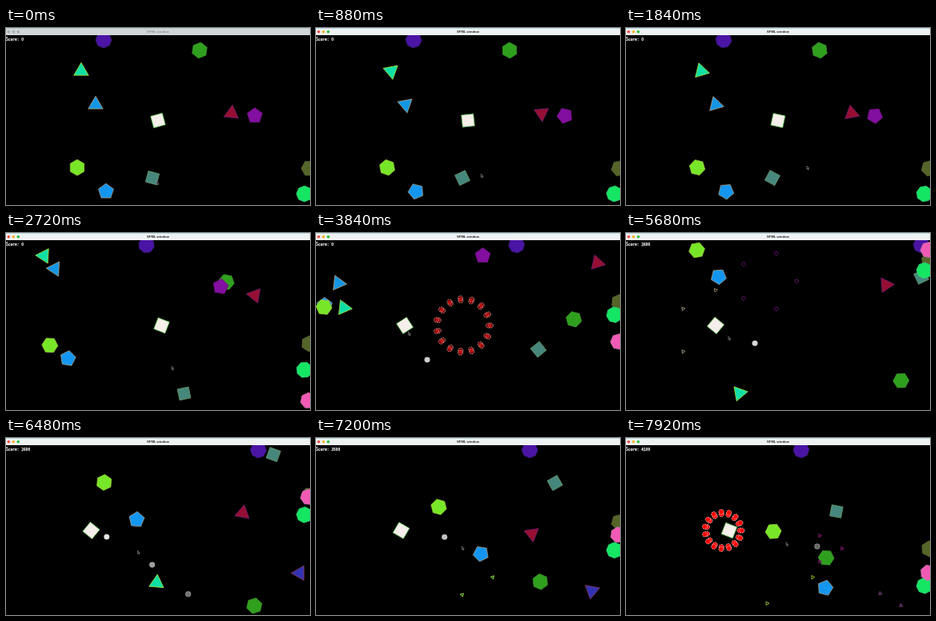
An HTML page that plays this animation: 380x222 px, repeating every 8 s.

```html
<!DOCTYPE html>
<html lang="en">
<head>
<meta charset="utf-8">
<title>SFML window</title>
<style>
html, body { margin: 0; width: 100%; height: 100%; overflow: hidden; background: #000; }
svg { display: block; width: 380px; height: 222px; }
.title { font: bold 4.2px "Liberation Sans", Arial, sans-serif; text-anchor: middle; }
.score {
  font: 5.5px "Noto Sans Mono CJK JP", "Noto Sans Mono", monospace;
  fill: #fff; stroke: #fff; stroke-width: .25; white-space: pre;
}
</style>
</head>
<body>
<svg viewBox="0 0 380 222">
  <rect width="380" height="222"/>
  <g id="scene"></g>
  <text class="score" id="score" x="0" y="16"></text>
  <g id="bar"></g>
  <path id="cursor" d="M0 0V4L1 3.2L1.7 5L2.4 4.6L1.7 3H2.9Z" fill="#111" stroke="#aaa" stroke-width=".5"/>
</svg>
<script>
const LOOP = 8000, STEP = 80;
const START = 1920;          // enemies begin to travel
const CRASH = 4130;          // the player is hit and returns to the middle
const HOME = { x: 190, y: 116 };
const WALL = { l: 8.5, r: 371.5, t: 18, b: 214.5 };
const SPIN = .0563, PLAYER_SPIN = .1125;   // degrees per ms
const BULLET_SPEED = .11;                  // px per ms
const el = id => document.getElementById(id);

// x, y: place at START; heading: compass letters; speed: px per second on each axis
const enemy = (sides, x, y, heading, speed, fill, line, more) => ({
  sides, x, y, fill, line,
  vx: speed * (heading.includes('e') - heading.includes('w')),
  vy: speed * (heading.includes('s') - heading.includes('n')),
  turn: 0, born: 0, dies: Infinity, shots: [], ...more
});

// shots: when each shard of a broken enemy is shot
const enemies = [
  enemy(8, 122, 15, 'e', 67, '#4a14a5', '#3c1c78'),
  enemy(6, 242, 28, 'se', 41.8, '#2fa01e', '#3f8c30', { turn: 8 }),
  enemy(3, 94, 54, 'nw', 58.2, '#10dfa5', '#b4e632', { dies: 6600, shots: [, , 7200] }),
  enemy(3, 112, 96, 'nw', 64, '#1496e6', '#b9a27c', { dies: 4762, shots: [4850] }),
  enemy(3, 282, 107, 'ne', 36.2, '#960f32', '#6e1e78', { turn: 6, dies: 7710 }),
  enemy(5, 311, 110, 'nw', 53.4, '#820fa0', '#6e1478', { dies: 4437 }),
  enemy(5, 125, 205, 'nw', 59.5, '#1496f0', '#a89a7c'),
  enemy(6, 89, 175, 'nw', 42.7, '#78e628', '#9bc83c'),
  enemy(4, 183, 188, 'se', 49.5, '#46877d', '#6f9a68', { turn: 60 }),
  enemy(6, 379, 176, 'n', 46.5, '#556428', '#5f6937', { turn: 30 }),
  enemy(8, 373, 208, 's', 61.7, '#14e664', '#3cc878'),
  enemy(7, 378, 263, 'n', 66, '#f05ab4', '#c878aa', { born: 2480 }),
  enemy(3, 45, 20, 'se', 39.8, '#5a82a0', '#b9a27c', { born: 3920, dies: CRASH, shots: [4700, 5360] }),
  enemy(3, 508.4, 28, 'sw', 31, '#3232b4', '#8c3c50', { turn: 25, born: 5760, dies: 7790 })
];

const shot = (t, x, y, end = Infinity) => ({ t, x, y, end });
const bullets = [
  shot(3449, 139, 159),
  shot(4615, 152, 117, 5360),
  shot(5370, 228, 196),
  shot(5710, 181, 158, 6600),
  shot(6290, 126, 124, 7200),
  shot(6702, 239, 136)
];
const blasts = [2860, 7820];

const playerPath = [[0, 190], [2660, 190], [2720, 194.5], [3840, 111], [CRASH, 133],
  [CRASH, HOME.x], [4640, HOME.x], [5754, 106.5], [7620, 106.5], [8000, 135]];
const mousePath = [[0, 188, 192], [1840, 226, 173], [2720, 207, 167], [3840, 115.5, 124],
  [4960, 95, 119.5], [6480, 164.5, 141], [8000, 202, 130]];

function along(keys, t, k = 1) {
  const i = keys.findIndex(key => key[0] > t), a = keys[i - 1], b = keys[i];
  return a[k] + (b[k] - a[k]) * (t - a[0]) / (b[0] - a[0]);
}

// reflects a straight path between two walls
function bounce(p, lo, hi) {
  const span = hi - lo;
  const m = (((p - lo) % (2 * span)) + 2 * span) % (2 * span);
  return lo + (m > span ? 2 * span - m : m);
}

function place(e, t) {
  const s = Math.max(0, t - START) / 1000;
  return [
    e.vx ? bounce(e.x + e.vx * s, WALL.l, WALL.r) : e.x,
    e.vy ? bounce(e.y + e.vy * s, WALL.t, WALL.b) : e.y
  ];
}

const around = (n, cx, cy, r, deg = 0) => Array.from({ length: n }, (_, i) => {
  const a = deg * Math.PI / 180 + i * 2 * Math.PI / n;
  return [cx + r * Math.cos(a), cy + r * Math.sin(a)];
});

const polygon = (n, x, y, r, deg, fill, line, alpha = 1) =>
  `<polygon points="${around(n, x, y, r, deg - 90).join(' ')}" fill="${fill}" ` +
  `fill-opacity="${alpha}" stroke="${line}" stroke-width=".8"/>`;

const disc = (x, y, r, rest) => `<circle cx="${x}" cy="${y}" r="${r}" ${rest}/>`;

function drawShards(e, t) {
  const age = (t - e.dies) / 1000;
  if (age > 1.6) return '';
  return around(e.sides, ...place(e, e.dies), 15 + 17.4 * age)
    .filter((_, i) => !(e.shots[i] <= t))
    .map(([x, y]) => polygon(e.sides, x, y, 2.6, SPIN * t + e.turn, e.fill, e.line, .7 * Math.max(0, 1 - age / 1.3)))
    .join('');
}

function drawEnemy(e, t) {
  if (t < e.born) return '';
  if (t >= e.dies) return drawShards(e, t);
  return polygon(e.sides, ...place(e, t), e.sides === 3 ? 10.6 : 10, SPIN * t + e.turn, e.fill, e.line);
}

function drawBullet(b, t) {
  const age = t - b.t;
  if (age < 0 || age > 2000 || t >= b.end) return '';
  const x = along(playerPath, b.t), dx = b.x - x, dy = b.y - HOME.y;
  const k = BULLET_SPEED * age / Math.hypot(dx, dy);
  return disc(x + dx * k, HOME.y + dy * k, 3.3,
    `fill="#fff" fill-opacity="${1 - age / 2000}" stroke="#ddd" stroke-opacity=".7" stroke-width=".6"`);
}

// two close rings of red bullets
function drawBlast(t0, t) {
  const age = (t - t0) / 1000;
  if (age < 0 || age > 1.9) return '';
  const look = `fill="#f00" fill-opacity="${1 - age / 1.9}" stroke="#fff" stroke-opacity="${1 - age / 4}" stroke-width=".7" stroke-dasharray="1.8 1"`;
  return [-1.4, 1.4].flatMap(gap =>
    around(15, along(playerPath, t0), HOME.y, 20.8 + 12.4 * age + gap).map(([x, y]) => disc(x, y, 3.1, look))
  ).join('');
}

function drawPlayer(t) {
  const turn = t < CRASH ? 75 + PLAYER_SPIN * t : 45 + PLAYER_SPIN * (t - CRASH);
  return polygon(4, along(playerPath, t), HOME.y, 10.6, turn + 45, '#f5eeea', '#64d25a');
}

function drawBar(t) {
  const on = t >= 400;
  const dots = on ? ['#f04a42', '#f4b020', '#28be3c'] : Array(3).fill('#a4acae');
  return `<rect width="380" height="9" fill="${on ? '#eff2f3' : '#d0d6d8'}"/>` +
    `<rect width="380" height="1" fill="${on ? '#b4dce4' : '#b4c8cc'}"/>` +
    dots.map((c, i) => disc(3.3 + 6 * i, 4.8, 1.8, `fill="${c}"`)).join('') +
    `<text class="title" x="190" y="6.3" fill="${on ? '#222' : '#8c9496'}">SFML window</text>`;
}

// a kill pays 100 per side, a shard twice that; a crash pays nothing
function score(t) {
  return enemies.reduce((sum, e) => {
    const kill = e.dies <= t && e.dies !== CRASH ? 1 : 0;
    return sum + 100 * e.sides * (kill + 2 * e.shots.filter(s => s <= t).length);
  }, 0);
}

function draw(t) {
  el('scene').innerHTML = [
    ...enemies.map(e => drawEnemy(e, t)),
    ...blasts.map(b => drawBlast(b, t)),
    ...bullets.map(b => drawBullet(b, t)),
    drawPlayer(t)
  ].join('');
  el('bar').innerHTML = drawBar(t);
  el('score').textContent = 'Score: ' + score(t);
  el('cursor').setAttribute('transform', `translate(${along(mousePath, t)} ${along(mousePath, t, 2)})`);
}

let begin = null;
function tick(now) {
  begin ??= now;
  draw(Math.floor(((now - begin) % LOOP) / STEP) * STEP);
  requestAnimationFrame(tick);
}
draw(0);
requestAnimationFrame(tick);
</script>
</body>
</html>
```
